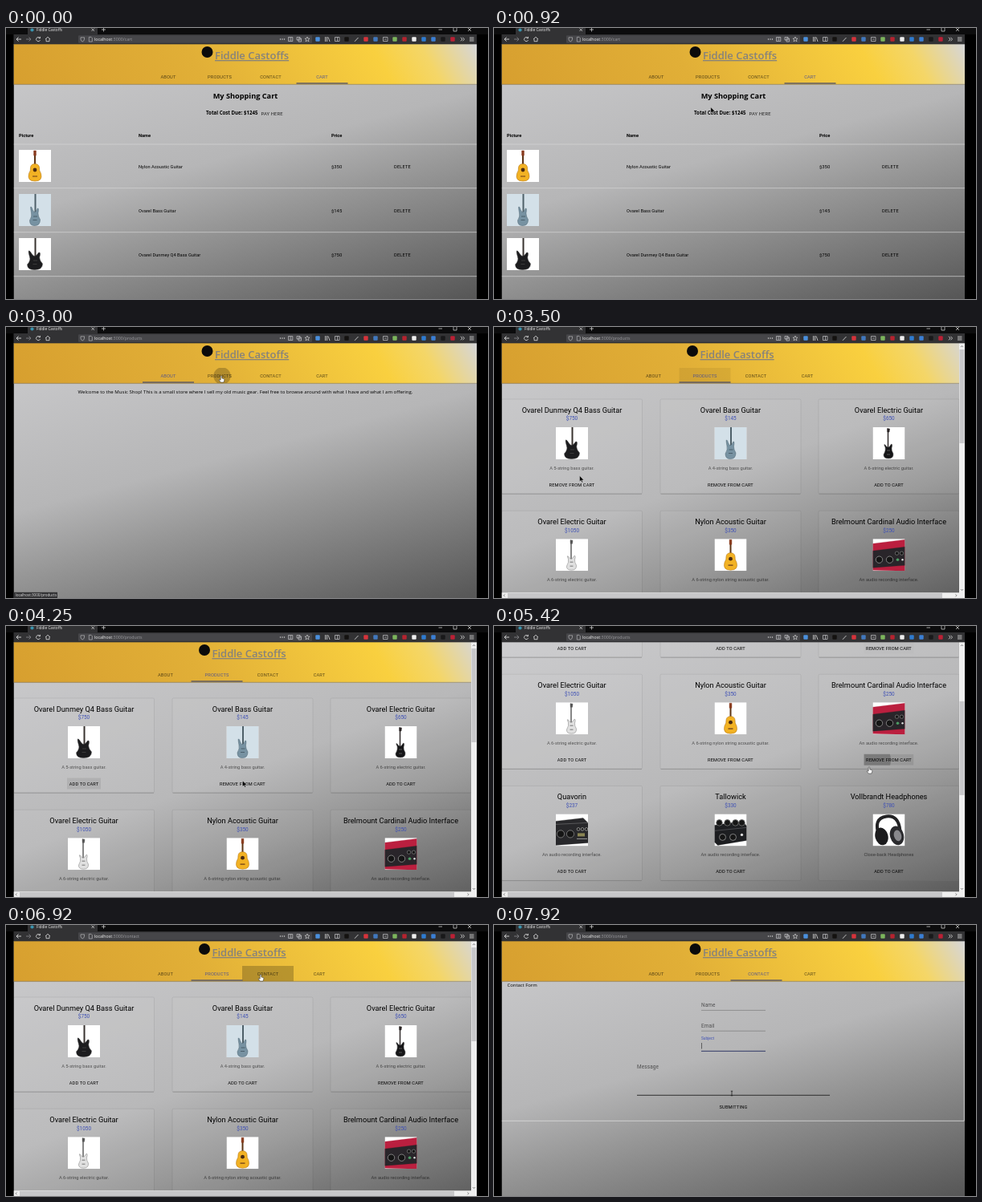
Recreate the animation shown at these times as an HTML page. Size 600 by 338 pixels, loop 8000 ms.

```html
<!DOCTYPE html>
<html lang="en">
<head>
<meta charset="utf-8">
<title>Shop demo</title>
<style>
  html, body { margin: 0; width: 100%; height: 100%; overflow: hidden; background: #000; }
  svg { display: block; }
  #stage { width: 100%; height: 100%; font-family: Roboto, sans-serif; }
  .u { font-family: "Open Sans", sans-serif; }
  .m { text-anchor: middle; }
  .b { font-weight: 700; }
  .c { letter-spacing: .15px; }
  .dim { fill: #000; fill-opacity: .58; }
  .blue { fill: #3f51b5; }
  .hide { display: none; }
</style>
</head>
<body>
<svg id="stage" viewBox="0 0 600 338" preserveAspectRatio="none"></svg>
<script>
const LOOP = 8000;
const TABS = ['ABOUT', 'PRODUCTS', 'CONTACT', 'CART'];
const TAB_X = [202, 266, 329.5, 393.5];
const PAGES = [[0, 'cart'], [1490, 'about'], [3080, 'products'], [7000, 'contact']];
const URLS = [[0, 'cart'], [1380, 'about'], [2950, 'products'], [6750, 'contact']];
const INDICATOR = { cart: 361.5, about: 170, products: 234, contact: 294.5 };
const SCROLL = [[0, 0], [4900, 0], [5120, 169], [5850, 169], [6180, 0], [LOOP, 0]];
const POINTER = [
  [250, 586, 300], [1150, 209, 60], [2300, 209, 60], [2800, 268, 61], [3150, 268, 61],
  [3560, 97, 193], [3900, 97, 193], [4200, 294.5, 193], [4420, 294.5, 193], [4680, 492, 195],
  [4850, 492, 195], [5120, 467, 171], [5250, 467, 171], [5400, 467, 176], [5900, 467, 176],
  [6400, 317, 62], [7000, 317, 62], [7500, 290, 150], [7700, 290, 150], [7890, 296, 210], [LOOP, 296, 210]
];
const HAND_SPANS = [[1080, 2350], [2720, 3100], [3520, 3950], [4290, 4450], [4650, 4880], [5100, 5600], [6350, 7020]];
const FOCUS_AT = 7640;

// name, price, description, picture, starts in cart, time the button is clicked
const PRODUCTS = [
  ['Ovarel Dunmey Q4 Bass Guitar', 750, 'A 5-string bass guitar.', 'darkBass', true, 3620],
  ['Ovarel Bass Guitar', 145, 'A 4-string bass guitar.', 'blueBass', true, 4350],
  ['Ovarel Electric Guitar', 650, 'A 6-string electric guitar.', 'darkElectric', false, 4700],
  ['Ovarel Electric Guitar', 1050, 'A 6-string electric guitar.', 'whiteElectric', false],
  ['Nylon Acoustic Guitar', 350, 'A 6-string nylon string acoustic guitar.', 'acoustic', true],
  ['Brelmount Cardinal Audio Interface', 250, 'An audio recording interface.', 'redBox', false, 5170],
  ['Quavorin', 237, 'An audio recording interface.', 'blackBox', false],
  ['Tallowick', 330, 'An audio recording interface.', 'knobBox', false],
  ['Vollbrandt Headphones', 780, 'Close-back Headphones', 'headphones', false]
];

const text = (x, y, s, size, cls = '', more = '') =>
  `<text x="${x}" y="${y}" font-size="${size}" class="${cls}" ${more}>${s}</text>`;
const rect = (x, y, w, h, fill, more = '') =>
  `<rect x="${x}" y="${y}" width="${w}" height="${h}" fill="${fill}" ${more}/>`;
const circle = (x, y, r, fill, more = '') => `<circle cx="${x}" cy="${y}" r="${r}" fill="${fill}" ${more}/>`;
const ellipse = (x, y, rx, ry, fill, turn = 0) =>
  `<ellipse cx="${x}" cy="${y}" rx="${rx}" ry="${ry}" fill="${fill}" transform="rotate(${turn} ${x} ${y})"/>`;
const path = (d, stroke, width = .8, fill = 'none', more = '') =>
  `<path d="${d}" stroke="${stroke}" stroke-width="${width}" fill="${fill}" ${more}/>`;
const group = (id, body, more = '') => `<g id="${id}" ${more}>${body}</g>`;
const gradient = (id, [x1, y1, x2, y2], stops) =>
  `<linearGradient id="${id}" gradientUnits="userSpaceOnUse" x1="${x1}" y1="${y1}" x2="${x2}" y2="${y2}">` +
  stops.map(([o, c]) => `<stop offset="${o}" stop-color="${c}"/>`).join('') + '</linearGradient>';

// Pictures, each 40 by 40
const solidGuitar = (body, neck, edge) =>
  path('M19 2V26', neck, 1.4) + path('M18 1.5L21 2L20.5 6H18.2Z', neck, .5, neck) +
  path('M15.5 25Q13 20 15.5 22Q17.5 25.5 19.5 25Q21 24.5 23 21Q25 21 23.5 26Q23 29 25.5 33Q26 39 19.5 39Q13 39 13.5 34Q16.5 29 15.5 25Z', edge, .5, body) +
  path('M17.5 29H21.5M17.5 34H21.5', edge, 1);
const bass = (body, neck, edge, half) =>
  path('M20.5 0V25', neck, 2) +
  path(`M${20 - half * .7} 23Q${20 - half} 13 ${20 - half * .6} 17Q18 23 20 22.5Q22 22 ${20 + half * .5} 18Q${20 + half * .8} 17 ${20 + half * .6} 24` +
    `Q${20 + half * .6} 28 ${20 + half} 32Q${20 + half} 39.5 20 39.5Q${20 - half} 40 ${20 - half} 33Q${20 - half * .5} 28 ${20 - half * .7} 23Z`, edge, .5, body) +
  path('M18 28H23M17.5 32.5H22.5', edge, 1.1);
const knobs = (xs, y, r, rim) => xs.map(x => circle(x, y, r, '#151515', `stroke="${rim}" stroke-width=".8"`)).join('');
const PICTURES = {
  darkBass: bass('#1c1c1e', '#38322f', '#3a3a3a', 9.5),
  blueBass: rect(0, 0, 40, 40, '#d3e0e8') + bass('#7792a2', '#4f6069', '#4b606d', 6.5),
  darkElectric: solidGuitar('#151517', '#2a2424', '#555'),
  whiteElectric: solidGuitar('#e0e0e0', '#545454', '#777'),
  acoustic: path('M20 3V24', '#5d3415', 2) + path('M18.6 1H21.4V7H18.6Z', '#8a3b1e', .5, '#8a3b1e') +
    path('M14.5 22Q15 17.5 20 17.5Q25 17.5 25.5 22Q25 25.5 27.5 29.5Q30 39 20 39Q10 39 12.5 29.5Q15 25.5 14.5 22Z', '#b87a1a', .6, '#f2b224') +
    circle(20, 25, 2.4, '#4a2a10') + path('M17 33H23', '#6b3d18', 1.2),
  redBox: path('M0 6L40 1V40L0 39Z', '#a51631', .3, '#bb1f3f') + path('M0 15L40 10V33L0 36Z', '#222', .3, '#29252a') +
    knobs([8, 21], 26, 4.2, '#999') + knobs([30, 36], 18, 2.2, '#777') + circle(31, 26, 1.8, '#4b9b63') + circle(37, 26, 1.2, '#ddd'),
  blackBox: path('M0 9L34 5L40 11V36L0 39Z', '#222', .3, '#28282b') + path('M0 13L40 11', '#77777a', .6) +
    knobs([6, 18], 25, 4.6, '#888') + knobs([28, 33, 38], 19, 1.8, '#aaa') + rect(27, 24, 9, 4, '#8a8553') + path('M26 31H39', '#999', 1),
  knobBox: path('M0 14L35 9L40 15V33L4 39L0 35Z', '#111', .3, '#1d1e21') + knobs([6, 16, 26, 34], 11, 3.8, '#777') +
    path('M0 21L40 17', '#66666a', .6) + knobs([10, 23], 29, 4, '#9a9a9a') + circle(34, 26, 1.7, '#ddd'),
  headphones: path('M8 28Q0 5 17 3Q32 1 34 21', '#222224', 4) + ellipse(11, 28, 8, 11, '#1b1b1d', -15) +
    ellipse(30, 27, 8.5, 12, '#2b2b2e', -15) + ellipse(31, 27, 4.6, 7, '#88888c', -15)
};
const picture = (name, x, y) =>
  `<svg x="${x}" y="${y}" width="40" height="40">${rect(0, 0, 40, 40, '#fff')}${PICTURES[name]}</svg>`;

// Click ripples, clipped to their button
const ripples = [];
function ripple(at, x, y, w, h, cx, cy, reach, hover) {
  ripples.push({ at, reach, hover });
  return `<svg class="ripple" x="${x}" y="${y}" width="${w}" height="${h}">` +
    rect(0, 0, w, h, '#000', 'rx="1" opacity="0"') + circle(cx - x, cy - y, 0, '#000') + '</svg>';
}

const header = () => rect(9.5, 20, 580, 50.5, 'url(#gold)') + path('M9.5 70.3H590', '#77736b', .6) +
  group('headerContent', circle(250.5, 30, 7, '#0b0b0b') +
    text(260, 39, 'Fiddle Castoffs', 13, 'u', 'font-weight="600" fill="#85827c" text-decoration="underline"') +
    ripple(1180, 170, 51, 64, 19, 209, 61, 60) + ripple(2850, 234, 51, 64, 19, 269, 61, 58) +
    ripple(6480, 297.5, 51, 64, 19, 320, 62, 66) +
    TABS.map((s, i) => text(TAB_X[i], 62.6, s, 5.7, 'tab m c')).join('')) +
  rect(170, 68.3, 64, 1.4, '#54546a', 'id="indicator"');

const cartRow = (i, y) => {
  const [name, price, , pic] = PRODUCTS[i];
  return picture(pic, 16, y - 20.5) + text(165, y + 2.5, name, 5.7) + text(405, y + 2.5, '$' + price, 5.9) +
    text(483, y + 2.5, 'DELETE', 5.7, 'c');
};
const cartPage = () =>
  text(298, 88.3, 'My Shopping Cart', 9.2, 'u b m') + text(249, 108.2, 'Total Cost Due: $1245', 6.1, 'u b') +
  text(317.5, 108.8, 'PAY HERE', 5.8, 'c', 'fill="#222"') +
  text(16, 135.8, 'Picture', 5.7, 'b') + text(165, 135.8, 'Name', 5.7, 'b') + text(405, 135.8, 'Price', 5.7, 'b') +
  [4, 1, 0].map((p, row) => cartRow(p, 172.5 + row * 55)).join('') +
  path('M9.5 145H586M9.5 199.7H586M9.5 254.7H586M9.5 309.7H586', '#d5d5d5', .7);

const card = ([name, price, about, pic, inCart, at], i) => {
  const x = [97, 294.5, 491.5][i % 3], y = Math.floor(i / 3) * 139.2;
  const w = inCart ? 42 : 62;
  return rect(x - 87.5, y + 90, 175, 118, '#fff', 'rx="1.5" fill-opacity=".04" stroke="#000" stroke-opacity=".1" stroke-width=".7"') +
    path(`M${x - 87} ${y + 208.2}H${x + 87}`, '#777', .7, 'none', 'opacity=".7"') +
    text(x, y + 106.5, name, 9.2, 'm') + text(x, y + 116.4, '$' + price, 6.4, 'm blue') +
    picture(pic, x - 20, y + 125) + text(x, y + 177.5, about, 5.75, 'm dim') +
    (at ? ripple(at, x - w / 2, y + 189.5, w, 14, at > 5000 ? 467 : x, y + 197, 62, true) : '') +
    text(x, y + 198.6, '', 5.65, 'action m c');
};

const field = (y, label) => text(258, y, label, 6.4, 'dim c') + path(`M258 ${y + 4.2}H338`, '#707070', .6);
const contactPage = () =>
  text(16.5, 77.2, 'Contact Form', 5.9, 'u') + path('M9.5 244.3H585.3V70', '#dedede', .8) +
  field(102.2, 'Name') + field(128, 'Email') +
  text(258, 153.3, 'Subject', 6.2, 'dim', 'id="subject"') + path('M258 157.4H338', '#707070', .6) +
  rect(258, 156.8, 80, 1, '#3b4270', 'id="focusLine"') + rect(258.2, 147, .6, 7.5, '#222', 'id="caret"') +
  text(178, 179.2, 'Message', 6.4, 'dim c') + path('M178 212.3H418', '#707070', .6, 'none', 'id="messageLine"') +
  text(298, 228.5, 'SUBMITTING', 5.7, 'm c');

const ICONS = [
  [388, '#4a90dd'], [424, '#141210'], [448, '#d6333b'], [460, '#4178bd'], [484, '#7cb55c'], [496, '#b5232f'],
  [508, '#eee'], [520, '#2e7bd0'], [532, '#3b7fd4'], [544, '#19191a'], [556, '#bb2035']
];
const chrome = () =>
  rect(0, 0, 600, 8, '#0c0c0d') + rect(27, 0, 87, 8, '#323234') + circle(32.5, 2.5, 2.1, '#3a93ad') +
  text(38, 4.2, 'Fiddle Castoffs', 4.7, 'u', 'fill="#eee"') +
  path('M106.5 .5L110 4M110 .5L106.5 4M119 2H124M121.5 0V4.5M538.5 2H543M557 0V4H561V0M575 0L579 4M579 0L575 4', '#ddd', .7) +
  rect(9.5, 8, 576.5, 12.3, '#323234') + rect(90, 9.3, 291, 9.4, '#464649', 'rx="1"') +
  path('M19 14H13M15.5 11.5L13 14L15.5 16.5', '#ddd', .9) + path('M25 14H31M28.5 11.5L31 14L28.5 16.5', '#808084', .9) +
  path('M42 12.2A2.6 2.6 0 1 0 42.6 15M42.5 10.8V12.8H40.4M49 14L52 11.2L55 14M50 13.5V16.7H54V13.5', '#ddd', .8) +
  path('M93 11.8H97.5V14Q97.5 16 95.2 17Q93 16 93 14ZM103.3 11.3H106L107.3 12.6V17H103.3Z', '#c5c5c8', .6) +
  text(110, 16, '<tspan fill="#f2f2f2">localhost</tspan><tspan fill="#9a9a9e">:3000/</tspan><tspan id="url" fill="#9a9a9e"></tspan>', 5.3, 'u') +
  [341.5, 344, 346.5].map(x => circle(x, 14, .7, '#ddd')).join('') +
  path('M351.5 11.5H356.8V16.5H351.5ZM353 13H355.5M353 15H355.5M362 11.5H366V15H362ZM364 13H367.5V17H364ZM409.5 11.5H415V16.5H409.5ZM412.5 11.5V16.5M469.5 11.5H475V16.5H469.5ZM471 14H473.5', '#c9c9cc', .7) +
  path('M375 11L375.9 13.1L378 13.2L376.3 14.6L377 16.8L375 15.6L373 16.8L373.7 14.6L372 13.2L374.1 13.1Z', '#ddd', .6) +
  path('M397.5 11V17M399.5 11V17M401 11.3L403 17M434 16.8L438.5 12M566 11.7L568 14L566 16.3M568.5 11.7L570.5 14L568.5 16.3M577 12H582.5M577 14H582.5M577 16H582.5', '#ddd', .8) +
  ICONS.map(([x, c]) => rect(x - 2.7, 11.3, 5.4, 5.4, c, 'rx="1"')).join('');

const scrollbars = () =>
  group('vbar', rect(579, 20, 7, 318, '#efefef') + rect(579.5, 28, 6, 117, '#c7c7c9', 'id="vthumb"') +
    path('M581 25L582.5 23.5L584 25M581 327L582.5 328.5L584 327', '#555', .7)) +
  group('hbar', rect(9.5, 331.3, 576.5, 7, '#efefef') + rect(17, 332, 373, 6, '#c7c7c9', 'id="hthumb"') +
    path('M13.5 333.3L12 334.8L13.5 336.3', '#555', .7) + path('M581.5 333.3L583 334.8L581.5 336.3', '#555', .7, 'none', 'id="harrow"'));

const stage = document.getElementById('stage');
stage.innerHTML = '<defs>' +
  gradient('gold', [69, 176, 527, -86], [[0, '#d79f2f'], [.4, '#e1af37'], [.78, '#f9d03f'], [.88, '#f4d668'], [1, '#d5d6dc']]) +
  gradient('grey', [239, -43, 357, 401], [[0, '#cbcbcd'], [.45, '#b6b6b7'], [.62, '#979797'], [1, '#555']]) +
  gradient('greyLong', [214, -53, 382, 411], [[0, '#cbcbcd'], [.5, '#b8b8b9'], [.7, '#979797'], [1, '#585858']]) +
  '<clipPath id="view"><rect x="9.5" y="20" width="576.5" height="318"/></clipPath></defs>' +
  rect(0, 0, 600, 338, '#000') +
  `<g clip-path="url(#view)">${rect(9.5, 20, 576.5, 318, 'url(#grey)', 'id="back"')}` +
  group('scroller', header() + group('cart', cartPage()) +
    group('about', text(298, 83.4, 'Welcome to the Music Shop! This is a small store where I sell my old music gear. Feel free to browse around with what I have and what I am offering.', 6.07, 'u m')) +
    group('products', PRODUCTS.map(card).join('')) + group('contact', contactPage())) +
  scrollbars() +
  group('status', rect(9.5, 330.8, 54.5, 8, '#323234') + text(11.5, 336.4, 'localhost:3000/products', 4.6, 'u', 'fill="#e4e4e4"')) +
  '</g>' + chrome() +
  group('pointer',
    path('M0 0V7.2L1.7 5.7L2.9 8.3L4 7.8L2.9 5.3H5.2Z', '#ddd', .4, '#000', 'id="arrow"') +
    path('M-.8 .2Q0-.6 .8 .2V3L3.4 3.6Q4 4 3.7 6L3 8H-.7L-3 5Q-2.6 4-.8 5.2Z', '#222', .5, '#fff', 'id="hand"') +
    path('M-1.2-2.8H1.2M0-2.8V2.8M-1.2 2.8H1.2', '#111', .7, 'none', 'id="beam"'));

const el = id => document.getElementById(id);
const set = (id, attrs) => Object.entries(attrs).forEach(([k, v]) => el(id).setAttribute(k, v));
const show = (id, on) => el(id).classList.toggle('hide', !on);
const clamp = v => Math.min(1, Math.max(0, v));
const smooth = v => v * v * (3 - 2 * v);
const easeOut = v => 1 - (1 - v) ** 3;
const within = (t, [a, b]) => t >= a && t < b;
const current = (steps, t) => steps.filter(s => s[0] <= t).pop();

function along(keys, t) {
  let i = keys.findIndex(k => k[0] > t);
  if (i < 0) i = keys.length - 1;
  if (i === 0) return keys[0].slice(1);
  const a = keys[i - 1], b = keys[i], p = smooth(clamp((t - a[0]) / (b[0] - a[0])));
  return a.slice(1).map((v, n) => v + (b[n + 1] - v) * p);
}

const tabNodes = [...document.querySelectorAll('.tab')];
const actionNodes = [...document.querySelectorAll('.action')];
const rippleNodes = [...document.querySelectorAll('.ripple')];

function drawRipples(t) {
  ripples.forEach(({ at, reach, hover }, i) => {
    const [plate, ring] = rippleNodes[i].children;
    const age = t - at;
    plate.setAttribute('opacity', hover && within(age, [-60, 350]) ? .09 : 0);
    ring.setAttribute('r', age < 0 ? 0 : reach * smooth(clamp(age / 550)));
    ring.setAttribute('opacity', age < 0 ? 0 : .22 * (1 - clamp((age - 440) / 300)));
  });
}

function draw(t) {
  const [since, page] = current(PAGES, t);
  const onProducts = page === 'products';
  PAGES.forEach(([, name]) => show(name, name === page));
  el('url').textContent = current(URLS, t)[1];

  const [scroll] = along(SCROLL, t);
  const shift = onProducts ? -3.5 : 0;
  set('scroller', { transform: `translate(0 ${-scroll})` });
  set('headerContent', { transform: `translate(${shift} 0)` });
  set('back', { fill: onProducts ? 'url(#greyLong)' : 'url(#grey)' });

  const previous = PAGES[Math.max(0, PAGES.findIndex(p => p[1] === page) - 1)][1];
  const from = INDICATOR[previous], to = INDICATOR[page];
  set('indicator', { x: from + (to - from) * smooth(clamp((t - since) / 180)) + (onProducts ? shift : 0) });
  tabNodes.forEach((node, i) => {
    const active = TABS[i].toLowerCase() === page;
    node.setAttribute('fill', active ? '#4a4f91' : '#000');
    node.setAttribute('fill-opacity', active ? .9 : .62);
  });

  const offset = 576 * (1 - easeOut(clamp((t - 1560) / 720)));
  const sliding = page === 'about' && offset > 1;
  set('about', { transform: `translate(${offset} 0)` });
  set('gold', { x2: sliding ? 563 : 527 });

  show('vbar', onProducts);
  show('hbar', onProducts || sliding);
  set('vthumb', { y: 28 + scroll * .39 });
  set('hthumb', { width: onProducts ? 541 : 373 });
  set('harrow', { transform: `translate(${onProducts ? -7 : 0} 0)` });
  show('status', within(t, [2720, 3080]));

  PRODUCTS.forEach(([, , , , inCart, at], i) => {
    const held = at && t >= at + 60 ? !inCart : inCart;
    actionNodes[i].textContent = held ? 'REMOVE FROM CART' : 'ADD TO CART';
  });
  drawRipples(t);

  const focus = smooth(clamp((t - FOCUS_AT) / 200));
  set('subject', { y: 153.3 - 10.2 * focus, 'font-size': 6.2 - 1.4 * focus, class: focus ? 'blue' : 'dim' });
  set('focusLine', { x: 298 - 40 * focus, width: 80 * focus });
  show('caret', focus > 0);
  const overMessage = t > 7820;
  set('messageLine', { stroke: overMessage ? '#222' : '#707070', 'stroke-width': overMessage ? .9 : .6 });

  const [x, y] = along(POINTER, t);
  const hand = HAND_SPANS.some(span => within(t, span));
  set('pointer', { transform: `translate(${x} ${y})` });
  show('pointer', t >= 250);
  show('hand', hand);
  show('beam', t > 7450);
  show('arrow', !hand && t <= 7450);
}

const start = performance.now();
function tick() {
  draw((performance.now() - start) % LOOP);
  requestAnimationFrame(tick);
}
tick();
</script>
</body>
</html>
```
